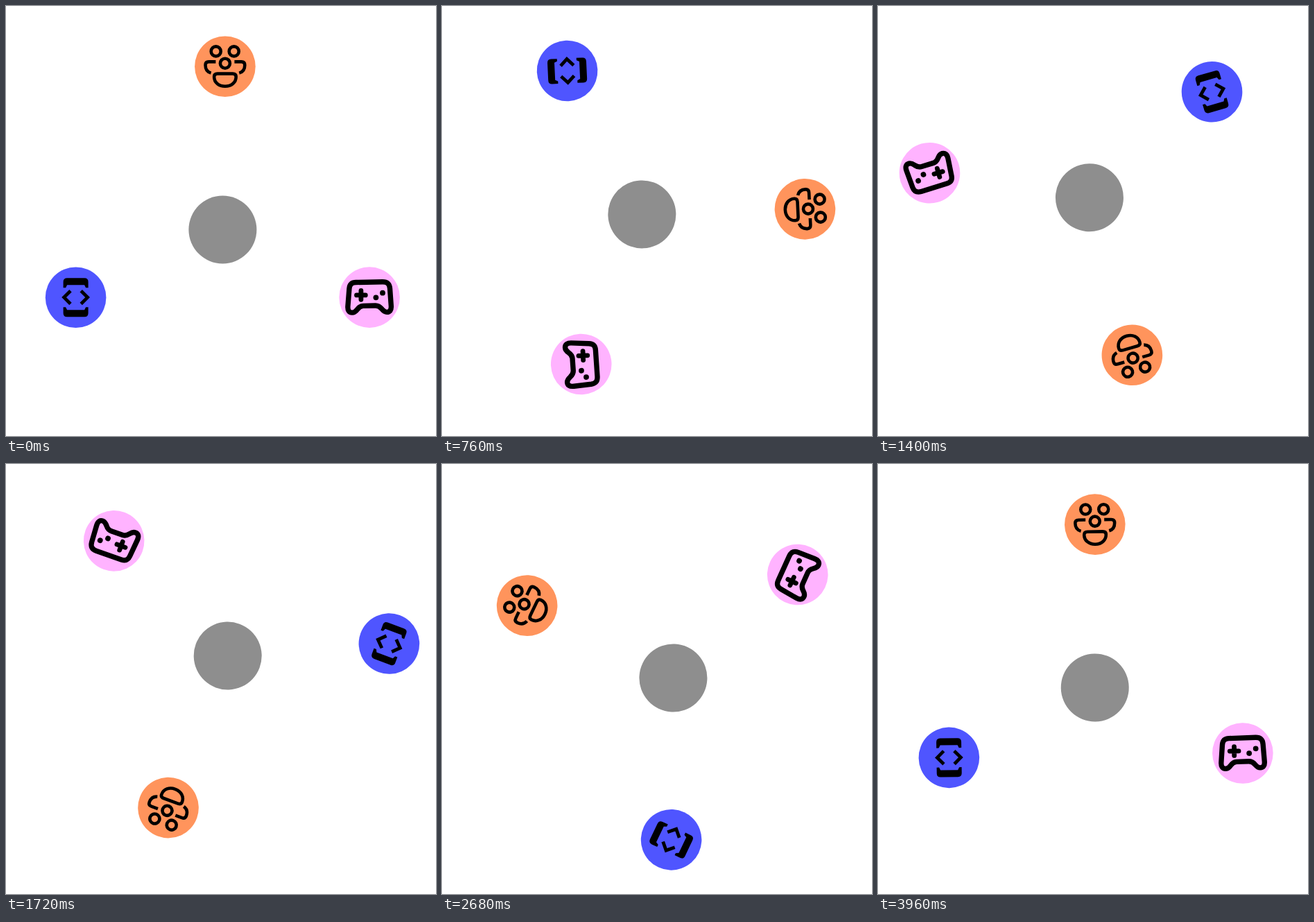
Write an HTML page that moves like this. It is 620 px wide and 620 px high and loops after 4 s.

```html
<!DOCTYPE html>
<html lang="en">
<head>
<meta charset="utf-8">
<title>Orbit</title>
<style>
  html, body { margin: 0; width: 100%; height: 100%; overflow: hidden; background: #fff; }
  svg { display: block; width: 100%; height: 100%; }
  .line { fill: none; stroke: #000; }
</style>
</head>
<body>
<svg viewBox="0 0 620 620">
  <g id="orbit">
    <circle cx="312.4" cy="322.4" r="49" fill="#8e8e8e"/>

    <g transform="translate(315.9 87.2)">
      <circle r="43.8" fill="#ff945c"/>
      <g class="line" stroke-width="4.6">
        <circle cx="-13.2" cy="-21.8" r="7"/>
        <circle cx="12.8" cy="-21.8" r="7"/>
        <circle cx="0" cy="-4.5" r="7"/>
        <path d="M-11 10.4H11Q15.8 10.4 15.8 14.7C15.8 23 9 28.6 0 28.6S-15.8 23-15.8 14.7Q-15.8 10.4-11 10.4Z"/>
        <path id="arm" d="M-13.5-6.8H-23.5Q-28.4-6.8-28.4-2C-28.4 4-25.5 8-20.3 9.4"/>
        <use href="#arm" transform="scale(-1 1)"/>
      </g>
    </g>

    <g transform="translate(100.6 420.3)">
      <circle r="43.8" fill="#4f55ff"/>
      <path id="cap" d="M-18-14V-22.5Q-18-28-12.5-28H12.5Q18-28 18-22.5V-14H14.5L12.5-18H-12.5L-14.5-14Z"/>
      <use href="#cap" transform="scale(1 -1)"/>
      <path id="chevron" class="line" stroke-width="4.8" d="M-7.6-9.6L-17-.2L-7.6 9.2"/>
      <use href="#chevron" transform="scale(-1 1)"/>
    </g>

    <g transform="translate(524.1 420.1)">
      <circle r="43.8" fill="#ffb3ff"/>
      <path class="line" stroke-width="7.4" stroke-linejoin="round"
        d="M-19.5-21.6L19-22.4C26-22.4 28.8-19 29.4-13L31.2 12C31.8 18.5 29 21.3 25 21.3C21.5 21.3 19.6 19 17.6 16.6C14.8 13.2 12.5 11.8 8.5 11.9L-9 12.3C-13 12.4-15 14-17.6 17.4C-19.8 20.4-21.8 22-25 22C-29.5 22-31.6 18.6-31.2 13L-29.2-12.5C-28.7-18.5-25.8-21.5-19.5-21.6Z"/>
      <path class="line" stroke-width="6.8" stroke-linecap="round" d="M-18.6-3.2H-5.8M-12.2-9.6V3.2"/>
      <circle cx="9.3" cy=".2" r="3.9"/>
      <circle cx="18.9" cy="-6.4" r="3.9"/>
    </g>
  </g>
</svg>
<script>
  const LOOP = 4000, STEP = 40;
  const CENTER = "311.9 298.8";
  // time in ms, rotation in degrees
  const KEYS = [
    [0, 0], [760, 87.3], [1400, 164], [2040, 235], [2680, 295.5],
    [3320, 340.2], [3680, 354.7], [3840, 358.1], [3960, 359.16], [4000, 360]
  ];
  const orbit = document.getElementById("orbit");

  const slope = (a, b) => (b[1] - a[1]) / (b[0] - a[0]);

  // Tangent at key i, weighted by the lengths of the neighbouring spans
  function tangent(i) {
    const prev = KEYS[i - 1], key = KEYS[i], next = KEYS[i + 1];
    if (!prev) return slope(key, next);
    if (!next) return slope(prev, key);
    const before = key[0] - prev[0], after = next[0] - key[0];
    return (slope(prev, key) * after + slope(key, next) * before) / (before + after);
  }

  function angleAt(t) {
    const i = KEYS.findIndex(k => k[0] > t) - 1;
    const [t0, a0] = KEYS[i], [t1, a1] = KEYS[i + 1];
    const span = t1 - t0, u = (t - t0) / span, v = 1 - u;
    return a0 * v * v * (1 + 2 * u) + a1 * u * u * (1 + 2 * v)
      + span * u * v * (tangent(i) * v - tangent(i + 1) * u);
  }

  function draw(ms) {
    const t = Math.floor((ms % LOOP) / STEP) * STEP;
    orbit.setAttribute("transform", `rotate(${angleAt(t)} ${CENTER})`);
  }

  const start = performance.now();
  function tick() {
    draw(performance.now() - start);
    requestAnimationFrame(tick);
  }
  tick();
</script>
</body>
</html>
```
